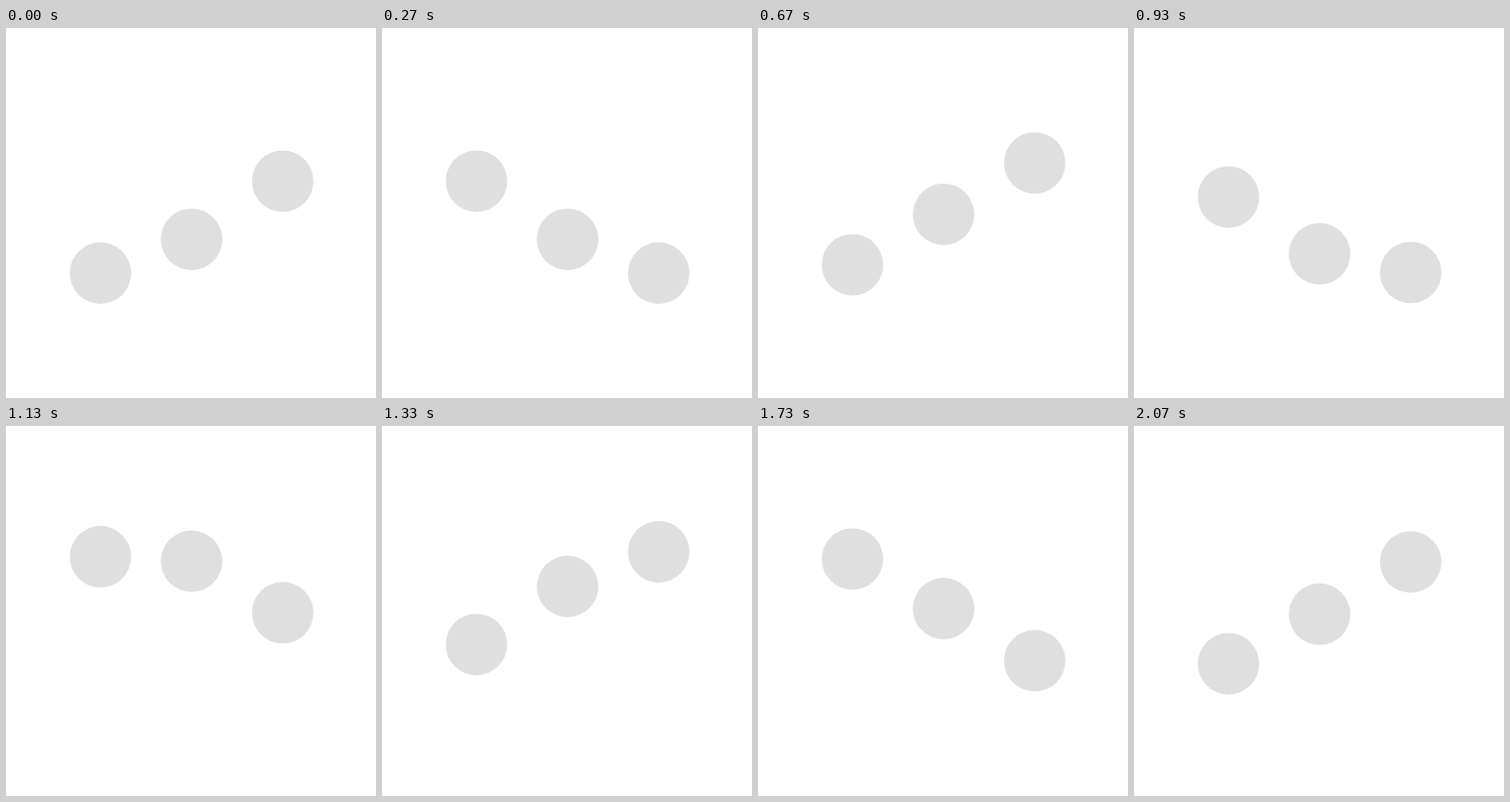
An HTML page that plays this animation: 385x385 px, repeating every 2140 ms.

```html
<!DOCTYPE html>
<html lang="en">
<head>
<meta charset="utf-8">
<title>Bouncing dots</title>
<style>
  html, body { margin: 0; width: 100%; height: 100%; overflow: hidden; background: #fff; }
  svg { display: block; width: 100vw; height: 100vh; }
  circle { fill: #dfdfdf; }
</style>
</head>
<body>
<svg viewBox="0 0 385 385">
  <circle cx="98.3" cy="255.4" r="32"/>
  <circle cx="193.1" cy="220" r="32"/>
  <circle cx="287.9" cy="159.5" r="32"/>
</svg>
<script>
  const LOOP = 2140, STEPS = 32, STEP = 200 / 3;
  const MIDDLE = 192.9, SWING = 62.5, LAG = 58;

  // Phase of the first dot in degrees at [step, phase]; three bounces per loop.
  const PHASES = [
    [0, -6.4], [4, 122.4], [10, 328.9], [14, 465.8],
    [20, 663.5], [26, 870.7], [31, 1050.7], [32, 1073.6]
  ];
  const dots = [...document.querySelectorAll("circle")];

  // Steps begin on whole hundredths of a second.
  const stepStart = n => Math.round(n * STEP / 10) * 10;

  function stepAt(time) {
    let n = STEPS - 1;
    while (n > 0 && stepStart(n) > time) n--;
    return n;
  }

  function phaseAt(step) {
    const i = PHASES.findIndex(([end]) => end > step);
    const [a, from] = PHASES[i - 1], [b, to] = PHASES[i];
    return from + (to - from) * (step - a) / (b - a);
  }

  function draw(time) {
    const phase = phaseAt(stepAt(time % LOOP));
    dots.forEach((dot, i) => {
      const angle = (phase - i * LAG) * Math.PI / 180;
      dot.setAttribute("cy", (MIDDLE + SWING * Math.cos(angle)).toFixed(2));
    });
  }

  const start = performance.now();
  function tick() {
    draw(performance.now() - start);
    requestAnimationFrame(tick);
  }
  tick();
</script>
</body>
</html>
```
